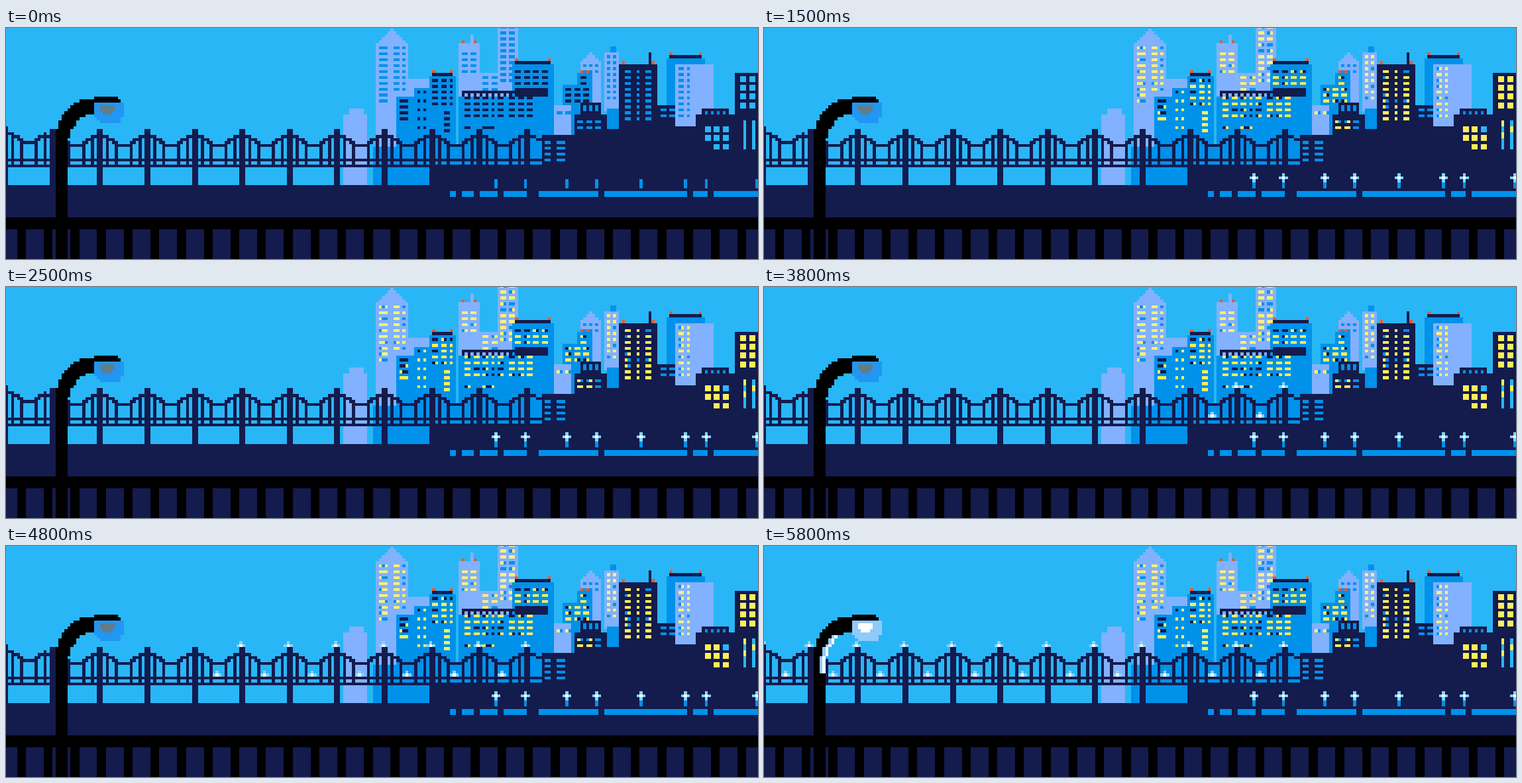
Recreate the animation shown at these times as an HTML page. Size 1135 by 350 pixels, loop 6300 ms.

```html
<!DOCTYPE html>
<html lang="en">
<head>
<meta charset="utf-8">
<title>City at dusk</title>
<style>
html, body { margin: 0; width: 100%; height: 100%; overflow: hidden; background: #29b6f6; }
svg { display: block; width: 1135px; height: 350px; }
</style>
</head>
<body>
<svg viewBox="0 0 1135 350" shape-rendering="crispEdges">
  <g id="scene" transform="translate(-1.3 1) scale(4.475)"></g>
</svg>
<script>
const SKY = '#29b6f6', BLUE = '#0091ea', LAV = '#82b1ff', NAVY = '#141b4d';
const RED = '#ff5722', YELLOW = '#ffee58', CREAM = '#fff176', BLACK = '#000';
const GLOW = '#90caf9', PALE = '#81d4fa', WHITE = '#fff';
const LOOP = 6300;
const WATER = 53, RAIL = 64, END = 254, BOTTOM = 79;
const SPAN = 16, LAST_TOWER = 175;

const scene = document.getElementById('scene');
let layer = scene;

function add(tag, parent) {
  return parent.appendChild(document.createElementNS('http://www.w3.org/2000/svg', tag));
}

// Boxes are [x, y, width, height] in art pixels.
function draw(fill, ...boxes) {
  const p = add('path', layer);
  p.setAttribute('fill', fill);
  p.setAttribute('d', boxes.map(([x, y, w, h]) => `M${x} ${y}h${w}v${h}h${-w}z`).join(''));
  return p;
}

function show(el, on) {
  el.setAttribute('visibility', on ? 'visible' : 'hidden');
}

const range = (from, to, by = 1) =>
  Array.from({ length: Math.ceil((to - from) / by) }, (_, i) => from + i * by);

let seed = 7;
const rand = () => (seed = (seed * 16807) % 2147483647) / 2147483647;

const cityLights = [];

const block = (fill, x, top, w, bottom = 46) => draw(fill, [x, top, w, bottom - top]);

function beacons(x, y, w) {
  draw(RED, [x, y, 1, 1], [x + w - 1, y, 1, 1]);
}

function roof(x, y, w) {
  draw(NAVY, [x, y, w, 1]);
  beacons(x, y - 1, w);
}

function spire(cx, top, n) {
  draw(LAV, ...range(0, n).map(i => [cx - i, top + i, 2 * i + 1, 1]));
}

// Every '#' in the pattern is a window; a seeded share of them lights up.
function panes(off, on, x, y, pattern, rows, { step = 2, w = 1, h = 1, share = 0.75 } = {}) {
  const all = range(0, rows).flatMap(r =>
    [...pattern].flatMap((c, i) => c === '#' ? [[x + i, y + r * step, w, h]] : []));
  draw(off, ...all);
  const lit = all.filter(() => rand() < share);
  if (lit.length) cityLights.push(draw(on, ...lit));
}

const softPanes = (...args) => panes(BLUE, CREAM, ...args);
const darkPanes = (...args) => panes(NAVY, YELLOW, ...args);
const bluePanes = (...args) => panes(BLUE, YELLOW, ...args);
const bigPanes = (...args) => panes(SKY, YELLOW, ...args, { step: 3, w: 2, h: 2, share: 0.9 });
const unlit = { share: 0 };

function farCity() {
  block(LAV, 116, 27, 5);
  block(LAV, 114, 29, 8, WATER);

  spire(130, 0, 5);
  block(LAV, 125, 5, 11, 40);
  block(LAV, 136, 17, 7);
  softPanes(126, 6, '###', 10);
  softPanes(131, 6, '##.#', 8);

  block(LAV, 157, 2, 1);
  block(LAV, 153, 5, 7);
  beacons(154, 4, 5);
  softPanes(154, 8, '##.##', 4);
  block(LAV, 160, 15, 11);
  softPanes(161, 16, '##.##', 3);
  block(LAV, 166, -1, 7);
  softPanes(167, -1, '##.##', 10);

  spire(197, 8, 3);
  block(LAV, 194, 11, 7, 28);
  softPanes(195, 12, '#.#.#', 2, unlit);
  block(BLUE, 204, 6, 2, 8);
  block(LAV, 202, 8, 5, 28);
  softPanes(203, 9, '#.#', 8);
}

function midCity() {
  block(BLUE, 124, 40, 19, WATER);
  block(BLUE, 132, 23, 6);
  darkPanes(133, 24, '###', 4, { share: 0.5 });
  block(BLUE, 138, 20, 5);
  darkPanes(139, 21, '#.#', 5, { step: 3 });
  block(BLUE, 143, 16, 9);
  roof(144, 15, 7);
  darkPanes(144, 17, '##.##.#', 5);
  darkPanes(148, 28, '##', 4);

  block(BLUE, 152, 39, 1);
  block(BLUE, 153, 23, 28);
  block(BLUE, 171, 12, 14, 36);
  roof(172, 11, 12);
  darkPanes(172, 14, '##.##.##.##', 3);
  draw(NAVY, [154, 21, 29, 1], [172, 20, 11, 3], ...range(154, 172, 2).map(x => [x, 22, 1, 1]));
  darkPanes(155, 23, '##.##.##.#.##..##.##.##', 4);
  darkPanes(155, 33, '##....####', 1);

  block(LAV, 185, 26, 6, 36);
  softPanes(186, 28, '##.##', 1, { share: 0.3 });
  block(BLUE, 188, 19, 9, 26);
  block(BLUE, 191, 26, 3, 36);
  block(BLUE, 193, 15, 5, 29);
  beacons(194, 14, 3);
  darkPanes(189, 20, '##.##.##', 3);
  darkPanes(194, 16, '##', 2);
  block(BLUE, 203, 27, 4, 34);

  block(BLUE, 223, 10, 13, 30);
  roof(224, 9, 11);
  block(LAV, 226, 12, 13, 33);
  softPanes(227, 13, '##.#', 9);
}

function nearCity() {
  block(NAVY, 181, 36, 73, WATER);
  block(NAVY, 143, 47, 111, WATER);
  block(NAVY, -1, WATER, END + 2, BOTTOM);
  bluePanes(182, 38, '##..###', 4, unlit);

  block(NAVY, 194, 25, 7);
  block(NAVY, 192, 29, 11);
  bluePanes(195, 26, '#.#.#', 1, { h: 2, share: 0 });
  bluePanes(193, 31, '##.##.##', 2);
  block(NAVY, 203, 34, 4);

  block(NAVY, 217, 8, 1);
  block(NAVY, 207, 12, 13);
  beacons(208, 11, 11);
  bluePanes(209, 14, '##..#..##', 9);
  block(NAVY, 220, 26, 6);
  bluePanes(221, 27, '##.##', 2, unlit);
  block(NAVY, 226, 33, 8);

  block(NAVY, 235, 27, 9);
  bluePanes(236, 28, '#.#.#.#', 1, unlit);
  block(NAVY, 233, 29, 21);
  bigPanes(236, 33, '#..#..#', 2);
  bigPanes(239, 39, '#..#', 1);
  block(NAVY, 246, 15, 8);
  bigPanes(248, 16, '#..#', 4);
  panes(SKY, YELLOW, 249, 31, '#..#', 5, { h: 2 });
}

function bridge() {
  draw(NAVY, [-1, 44, 182, 1], [-1, 46, 182, 1]);
  for (let x = -1; x <= LAST_TOWER; x += SPAN) {
    const top = x < 0 ? 33 : 34;
    draw(NAVY, [x, top, 2, WATER - top], [x - 2, top + 2, 6, 1]);
    if (x === LAST_TOWER) {
      draw(NAVY, [x + 4, top + 3, 2, 1]);
      break;
    }
    // Each half of the cable steps down to the middle of the span.
    const cable = [[4, 3, 2], [5, 4, 2], [7, 5, 2]];
    const hangers = [[3, 2], [6, 4]];
    const mirror = (dx, w) => [x + dx, x + SPAN + 2 - dx - w];
    for (const [dx, dy, w] of cable) mirror(dx, w).forEach(u => draw(NAVY, [u, top + dy, w, 1]));
    for (const [dx, dy] of hangers) mirror(dx, 1).forEach(u => draw(NAVY, [u, top + dy, 1, 46 - top - dy]));
  }
}

function shore() {
  draw(BLUE, [150, 55, END - 150, 2]);
  draw(NAVY, ...[152, 158, 166, 176, 178, 200, 230, 237].map(x => [x, 55, 2, 2]));
  for (const x of [165, 175, 189, 199, 214, 229, 236, 253]) {
    draw(BLUE, [x, 51, 1, 3]);
    cityLights.push(
      draw(PALE, [x, 49, 1, 3], [x - 1, 50, 3, 1]),
      draw(WHITE, [x, 50, 1, 1]));
  }
}

// Lights alternate between tower tops and the deck, from right to left.
function bridgeLight(i) {
  layer = add('g', scene);
  const x = LAST_TOWER - i * SPAN / 2;
  const y = i % 2 ? 42 : x < 0 ? 31 : 32;
  draw(PALE, [x, y, 1, 1], [x - 1, y + 1, 3, 1]);
  draw(WHITE, [x, y + 1, 1, 1]);
  return layer;
}

function railing() {
  draw(BLACK, [-1, RAIL, END + 2, 4], ...range(4, END, 9).map(x => [x, RAIL + 4, 3, BOTTOM - RAIL]));
}

// Left side of an ellipse, straight below its centre.
function bend(y, cx, cy, rx, ry) {
  const k = Math.max(0, cy - y) / ry;
  return Math.round(cx - rx * Math.sqrt(1 - k * k));
}

function streetLamp() {
  const outer = y => bend(y, 30, 37, 13, 14);
  const inner = y => y < 25 ? 39 : y < 29 ? 30 : bend(y, 31, 40, 10, 12);
  draw(BLACK, [30, 23, 8, 1],
    ...range(24, BOTTOM).map(y => [outer(y), y, inner(y) - outer(y), 1]));
  const head = draw(GLOW, [30, 25, 10, 5], [31, 30, 8, 1], [32, 31, 7, 1]);
  const bulb = draw(WHITE, [32, 26, 5, 2], [33, 28, 3, 1]);
  const edge = range(30, 43);
  const shine = [
    draw(GLOW, ...edge.map(y => [inner(y) - 2, y, 1, 1])),
    draw(WHITE, ...edge.map(y => [inner(y) - 1, y, 1, 1]))
  ];
  return on => {
    head.setAttribute('fill', on ? GLOW : '#2196f3');
    bulb.setAttribute('fill', on ? WHITE : '#607d8b');
    shine.forEach(s => show(s, on));
  };
}

farCity();
midCity();
nearCity();
bridge();
shore();
const bridgeLights = range(0, 23).map(bridgeLight);
layer = scene;
railing();
const setLamp = streetLamp();

function render(t) {
  const cityOn = (t >= 1500 && t < 2000) || t >= 2500;
  cityLights.forEach(el => show(el, cityOn));
  bridgeLights.forEach((el, i) => show(el, t >= 3500 + 100 * i));
  setLamp(t >= 5800);
}

const start = performance.now();
function tick() {
  render((performance.now() - start) % LOOP);
  requestAnimationFrame(tick);
}
render(0);
requestAnimationFrame(tick);
</script>
</body>
</html>
```
